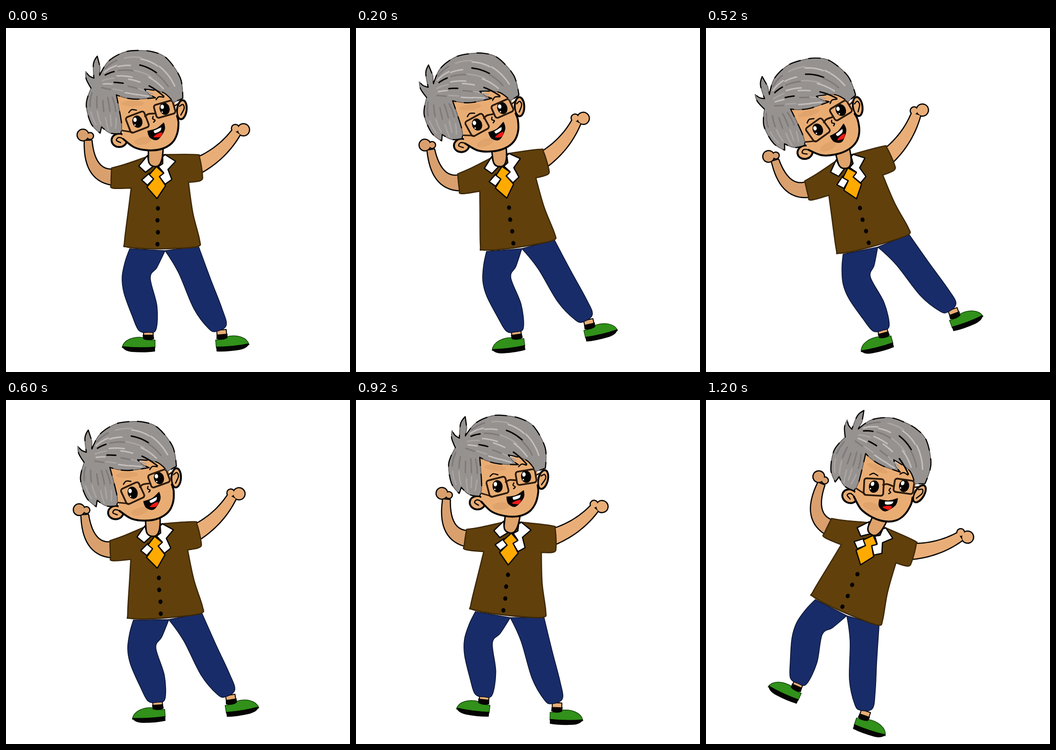
These frames come from a looping animation (720 by 720 pixels, 1400 ms). An HTML page with a canvas:

```html
<!DOCTYPE html>
<html lang="en">
<head>
<meta charset="utf-8">
<title>Swaying dancer</title>
<style>
  html, body { margin: 0; width: 100%; height: 100%; overflow: hidden; background: #fff; }
  canvas { display: block; width: 100vw; height: 100vh; filter: blur(.5px); }
</style>
</head>
<body>
<canvas id="stage" width="720" height="720"></canvas>
<script>
const ctx = document.getElementById('stage').getContext('2d');

const STEP = 200;
const PIVOT = { x: 316, y: 357 };
// Where the pivot sits and the tilt in degrees, one pose per step
const POSES = [
  [316, 357, 0], [315.6, 356, -7.7], [315, 357.5, -14.9], [316.6, 352, -3.8],
  [318.5, 345.3, 6.6], [321.5, 339, 17], [323.5, 345, 24]
];

const INK = '#050403', SKIN = '#e9ad74', SHADE = '#dfa36b', BROWN = '#61400b', BLUE = '#182c69';
const GREEN = '#31911a', FRAME = '#2b1a0b', GREY = '#969290';

const parts = [];
const add = (path, fill, stroke, width, dash = []) => parts.push({ path, fill, stroke, width, dash });

// Smooth path through "x,y" points; "!" marks a sharp corner
function curve(text, closed) {
  const pts = text.split(' ').map(s => {
    const [x, y] = s.replace('!', '').split(',').map(Number);
    return { x, y, sharp: s.endsWith('!') };
  });
  const n = pts.length;
  const at = i => closed ? pts[(i + n) % n] : pts[Math.max(0, Math.min(n - 1, i))];
  const handle = (i, dir) => {
    const p = at(i), a = at(i - 1), b = at(i + 1), k = p.sharp ? 0 : dir / 6;
    return [p.x + (b.x - a.x) * k, p.y + (b.y - a.y) * k];
  };
  const path = new Path2D();
  path.moveTo(pts[0].x, pts[0].y);
  for (let i = 0; i < (closed ? n : n - 1); i++) {
    const end = at(i + 1);
    path.bezierCurveTo(...handle(i, 1), ...handle(i + 1, -1), end.x, end.y);
  }
  if (closed) path.closePath();
  return path;
}

const shape = (fill, pts, stroke, width) => add(curve(pts, true), fill, stroke, width);
const line = (stroke, width, pts) => add(curve(pts), null, stroke, width);

function ellipse(x, y, rx, ry = rx, turn = 0) {
  const path = new Path2D();
  path.ellipse(x, y, rx, ry, turn, 0, Math.PI * 2);
  return path;
}

// Limb along a quadratic curve, its width running from w0 to w1
function limb([x0, y0], [cx, cy], [x1, y1], w0, w1) {
  const path = new Path2D(), steps = 16;
  const side = (t, sign) => {
    const s = 1 - t;
    const dx = s * (cx - x0) + t * (x1 - cx), dy = s * (cy - y0) + t * (y1 - cy);
    const k = sign * (w0 * s + w1 * t) / 2 / Math.hypot(dx, dy);
    path.lineTo(s * s * x0 + 2 * s * t * cx + t * t * x1 - dy * k,
                s * s * y0 + 2 * s * t * cy + t * t * y1 + dx * k);
  };
  for (let i = 0; i <= steps; i++) side(i / steps, 1);
  for (let i = steps; i >= 0; i--) side(i / steps, -1);
  path.closePath();
  return path;
}

// Several paths sharing one outline
function merged(fill, width, ...paths) {
  paths.forEach(p => add(p, null, INK, width));
  paths.forEach(p => add(p, fill));
}

function addShoe(x, y, dir, turn) {
  const place = new DOMMatrix().translate(x, y).rotate(turn).scale(dir, 1);
  const piece = (d, fill, stroke, width) => {
    const path = new Path2D();
    path.addPath(new Path2D(d), place);
    add(path, fill, stroke, width);
  };
  piece('M4-35H24V-20H4Z', SKIN, INK, 2);
  piece('M0 1V-15Q12-14 24-20C44-23 66-16 69 1Z', GREEN, '#17480c', 1.5);
  piece('M0-1Q34 2 69-2Q66 8 48 10Q20 12 0 9Z', INK);
  piece('M3-26H26L25-17Q13-12 2-17Z', INK);
}

function addLegs() {
  addShoe(312, 668, -1, 0);
  addShoe(440, 668, 1, -5);
  shape(BLUE, '259,462! 249,490 243,522 247,555 264,602 278,633 297,637 314,631 316,582 302,523 316,501 333,466!', '#0c1533', 1.6);
  shape(BLUE, '333,466! 361,512 393,587 424,629 440,635 461,622 452,587 428,525 403,457!', '#0c1533', 1.6);
}

function addArms() {
  merged('#d9a06e', 5, limb([172, 236], [174, 308], [222, 312], 14, 31),
    ellipse(161, 224, 11), ellipse(176, 226, 6));
  merged('#e9ae78', 5, limb([404, 287], [453, 262], [482, 218], 31, 18),
    ellipse(497, 213, 11.5), ellipse(480, 210, 7));
}

function addJacket() {
  shape(BROWN, '221,293! 250,285 296,269! 330,265! 397,265 405,271 411,306 408,319 382,323! 391,387 405,443 402,457 ' +
    '362,461 300,462 252,458 248,448 257,375 262,335! 223,335 220,325', '#3c2706', 2.5);
  const patch = (fill, d) => add(new Path2D(d), fill, INK, 2.5);
  patch('#fff', 'M296 267L278 289L292 302L310 288L299 281Z');
  patch('#fff', 'M300 304L284 318L296 329L309 316Z');
  patch('#fff', 'M328 269L333 265L355 279L339 296L347 317L333 327L321 311L330 303L319 290L328 284Z');
  patch('#ffaa00', 'M315 290L330 304L321 311L334 330L316 357L295 333L309 316L300 307Z');
  add(new Path2D('M298 250V276Q299 290 314 290Q328 289 329 250'), SHADE, INK, 3);
  for (let i = 0; i < 4; i++) add(ellipse(318 - i % 2, 377.5 + 25 * i, 4.3, 4.8), INK);
}

function addEye(x, y, height, turn) {
  const lens = new Path2D(), place = new DOMMatrix().translate(x, y).rotate(turn);
  const rim = new Path2D();
  rim.roundRect(-20.5, -height / 2, 41, height, 5);
  lens.addPath(rim, place);
  add(ellipse(x, y - 1, 10.5, 13, -.25), INK);
  add(ellipse(x - 5, y - 5, 3.6, 4.6), '#fff');
  add(ellipse(x - 5, y + 6, 1.5), '#fff');
  add(lens, null, FRAME, 3.6);
  line(INK, 2.5, `${x - 18},${y - 20} ${x - 12},${y - 26} ${x - 2},${y - 25}`);
}

function addFace() {
  add(ellipse(237, 235, 16, 14), SKIN, INK, 4);
  add(ellipse(368, 171, 10, 20, .12), SKIN, INK, 4);
  line(INK, 2.5, '247,232 236,229 231,235 240,240');
  line(INK, 2.5, '363,164 370,160 373,168 366,182');
  const jaw = '245,232 269,250 298,256 326,253 347,241 358,222 361,198 358,184';
  shape(SKIN, `231,132! 243,215 ${jaw} 350,130!`);
  add(ellipse(266, 158, 23, 6), SHADE);
  add(ellipse(287, 236, 18, 8, -.2), SHADE);
  line(INK, 4, jaw);

  addEye(275, 197, 35, -21);
  addEye(332, 170, 28, -16);
  line(FRAME, 3.6, '291,185 298,180 311,179');
  line(FRAME, 3, '240,214 264,218');
  line(FRAME, 3, '353,163 361,158');
  line(INK, 2.5, '308,185 307,190 312,193 309,197');

  shape(INK, '297,216! 315,211 330,199! 331,214 317,233 302,229', INK, 2);
  shape('#fff', '309,215! 325,208! 323,215 312,220');
  shape('#ee1815', '309,228 318,221 327,219 323,228');
}

let seed = 11;
const random = () => (seed = seed * 16807 % 2147483647) / 2147483647;

// Locks that flow between two cubic edges
function addLocks(from, to, rows, perRow) {
  const mix = (a, b, t) => a + (b - a) * t;
  const colors = ['#7f7a79', '#c4bfbd', '#aaa5a3', INK, '#c4bfbd'];
  for (let i = 0; i < rows * perRow; i++) {
    const row = Math.floor(i / perRow);
    const u = (row + .3 + random() * .4) / rows;
    const start = .08 + (i % perRow + random() * .4) * .84 / perRow;
    const length = .55 / perRow + random() * .08;
    const path = new Path2D();
    for (let k = 0; k <= 6; k++) {
      const t = start + length * k / 6, s = 1 - t;
      const weights = [s * s * s, 3 * s * s * t, 3 * s * t * t, t * t * t];
      const coord = axis => weights.reduce((sum, w, j) => sum + w * mix(from[j][axis], to[j][axis], u), 0);
      path.lineTo(coord(0), coord(1));
    }
    add(path, null, colors[(i * 2 + row) % colors.length], 3);
  }
}

function addHair() {
  const outline = curve('191,59! 183,75 184,105! 174,100 167,91! 168,107 178,126! 168,160 178,200 197,220! 200,207! ' +
    '218,220 240,221! 242,200 231,140! 249,146 273,149 313,146! 299,138 290,128! 329,135 351,156! 370,147! ' +
    '365,105 337,64 308,50 276,47 246,51 214,70 196,99! 197,82!', true);
  add(outline, GREY, '#5b5655', 1.5);
  addLocks([[197, 100], [218, 45], [335, 25], [366, 145]], [[190, 124], [215, 132], [250, 145], [310, 145]], 6, 4);
  addLocks([[180, 128], [166, 155], [170, 185], [192, 212]], [[222, 135], [240, 165], [238, 190], [233, 215]], 5, 2);
  add(outline, null, INK, 2.4, [24, 18]);
}

function draw(step) {
  const [x, y, tilt] = POSES[step];
  ctx.setTransform(1, 0, 0, 1, 0, 0);
  ctx.fillStyle = '#fff';
  ctx.fillRect(0, 0, 720, 720);
  ctx.translate(x, y);
  ctx.rotate(tilt * Math.PI / 180);
  ctx.translate(-PIVOT.x, -PIVOT.y);
  ctx.lineCap = ctx.lineJoin = 'round';
  for (const { path, fill, stroke, width, dash } of parts) {
    if (fill) {
      ctx.fillStyle = fill;
      ctx.fill(path);
    }
    if (stroke) {
      ctx.strokeStyle = stroke;
      ctx.lineWidth = width;
      ctx.setLineDash(dash);
      ctx.stroke(path);
    }
  }
}

addLegs();
addArms();
addJacket();
addFace();
addHair();

const start = performance.now();
function tick() {
  const elapsed = performance.now() - start;
  draw(Math.floor(elapsed / STEP) % POSES.length);
  requestAnimationFrame(tick);
}
tick();
</script>
</body>
</html>
```
